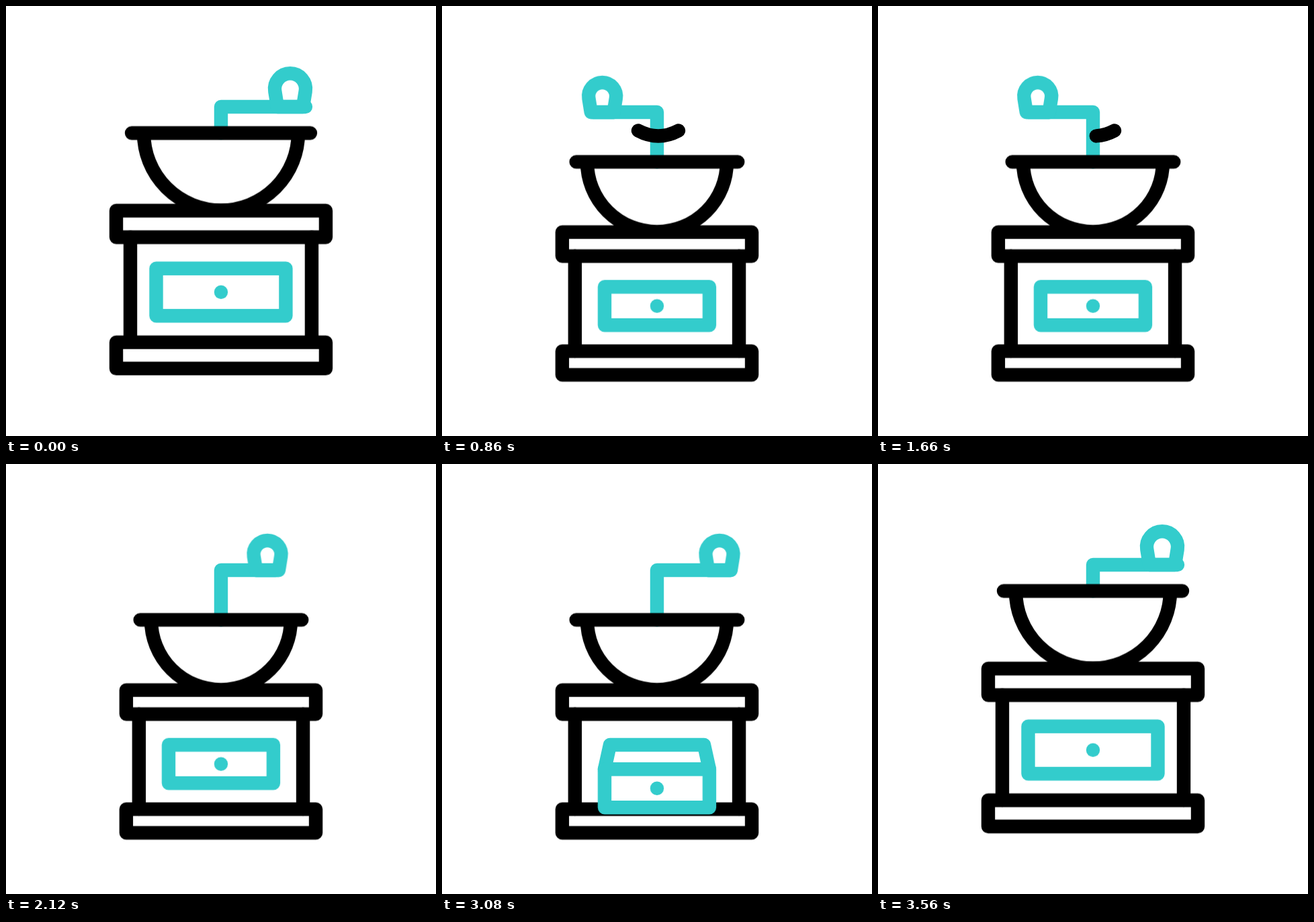
These frames come from a looping animation (640x640 px, 3.6 s). An HTML page without scripts:

```html
<!DOCTYPE html>
<html lang="en">
<head>
<meta charset="utf-8">
<title>Coffee grinder</title>
<style>
  html, body { margin: 0; width: 100%; height: 100%; overflow: hidden; background: #fff; }
  svg { display: block; width: 100vw; height: 100vh; }
  path, rect {
    fill: none; stroke: #000; stroke-width: 20.4;
    stroke-linecap: round; stroke-linejoin: round; vector-effect: non-scaling-stroke;
  }
  .teal path, .teal rect { stroke: #3cc; }
  .teal .solid { fill: #fff; }
  .body, .knob, .bar, .drawer, .slide, .tray, .swoosh, .aroma path {
    animation: 3600ms linear infinite;
  }

  .body { animation-name: body; }
  @keyframes body {
    0%, 98.89%, 100% { transform: translate(320px, 539.5px) scale(1); }
    11.11%, 88.89% { transform: translate(320px, 549px) scale(.9044); }
  }

  .knob { animation-name: knob; }
  @keyframes knob {
    0%, 98.89%, 100% { transform: translate(423px, 123px) scale(1); }
    11.11%, 12.5%, 34.39%, 61.11%, 88.89% { transform: translate(413px, 134px) scale(.89); }
    23.22% { transform: translate(227px, 134px) scale(.89); }
    45.5% {
      transform: translate(227px, 134px) scale(.89);
      animation-timing-function: cubic-bezier(.2, .3, .7, .72);
    }
  }

  .bar { animation-name: bar; }
  @keyframes bar {
    0%, 98.89%, 100% { d: path("M320 189L320 150L446 150"); }
    11.11%, 12.5%, 34.39% { d: path("M320 232L320 158L433 158"); }
    23.22% { d: path("M320 232L320 158L211 158"); }
    45.5% {
      d: path("M320 232L320 158L211 158");
      animation-timing-function: cubic-bezier(.2, .3, .7, .72);
    }
    61.11%, 88.89% { d: path("M320 232L320 158L429.5 158"); }
  }

  .drawer { animation-name: drawer; }
  @keyframes drawer {
    0%, 98.89%, 100% { transform: translate(320px, 425.75px) scale(1); }
    11.11%, 88.89% { transform: translate(320px, 446.5px) scale(.808); }
  }
  .slide { animation-name: slide; }
  @keyframes slide {
    0%, 61.11%, 88.89%, 100% { transform: translateY(0); }
    67.22%, 82.78% { transform: translateY(67px); }
  }
  .tray { animation-name: tray; }
  @keyframes tray {
    0%, 61.1% { opacity: 0; d: path("M250 418L390 418L398 418L242 418Z"); }
    61.11% { opacity: 1; d: path("M250 418L390 418L398 418L242 418Z"); }
    67.22%, 82.78% { opacity: 1; d: path("M250 418L390 418L398 485L242 485Z"); }
    88.88% { opacity: 1; d: path("M250 418L390 418L398 418L242 418Z"); }
    88.89%, 100% { opacity: 0; d: path("M250 418L390 418L398 418L242 418Z"); }
  }

  /* Strokes draw on, then wipe off in the same direction */
  .swoosh, .aroma path { vector-effect: none; stroke-dasharray: 1 1.02; stroke-dashoffset: 1.01; }
  .swoosh { animation-name: swoosh; }
  @keyframes swoosh {
    0%, 17.78%, 30.57%, 43.33% { stroke-dashoffset: 1.01; }
    23.33%, 25%, 49.44%, 51.11% { stroke-dashoffset: 0; }
    30.56%, 56.67%, 100% { stroke-dashoffset: -1.01; }
  }
  .aroma path { animation-name: aroma; }
  @keyframes aroma {
    0%, 67.5% { stroke-dashoffset: 1.01; }
    71.5%, 74.5% { stroke-dashoffset: 0; }
    81%, 100% { stroke-dashoffset: -1.01; }
  }
</style>
</head>
<body>
<svg viewBox="0 0 640 640">
  <g class="teal">
    <path class="bar" d="M320 189L320 150L446 150"/>
    <path class="knob" d="M-19 27L-22.7 4A23 23 0 1 1 22.7 4L19 27Z"/>
  </g>
  <path class="swoosh" pathLength="1" d="M352 185.5Q322 201.5 292 185.5"/>

  <g class="body">
    <path d="M-133 -350.5H133M-115 -350.5A115 115 0 0 0 115 -350.5"/>
    <path d="M-135 -195.5V-39M135 -195.5V-39"/>
    <rect x="-156" y="-235" width="312" height="39.5"/>
    <rect x="-156" y="-39" width="312" height="39"/>
  </g>

  <g class="teal">
    <path class="tray solid" d="M250 418L390 418L398 418L242 418Z"/>
    <g class="slide">
      <g class="drawer">
        <rect class="solid" x="-96.5" y="-35.25" width="193" height="70.5"/>
        <path d="M0 0h.01"/>
      </g>
    </g>
  </g>

  <g class="teal aroma">
    <path pathLength="1" d="M181 460C175 461 173 458 166 459S157 463 150 460"/>
    <path pathLength="1" d="M455 463C461 464 462 459 470 460S484 464 493 460"/>
    <path pathLength="1" d="M339.5 380C338 372 343 369 342 361S337 351 341 343"/>
    <path pathLength="1" d="M294.5 443C299 436 296 431 296 424S291 414 296 406"/>
  </g>
</svg>
</body>
</html>
```
